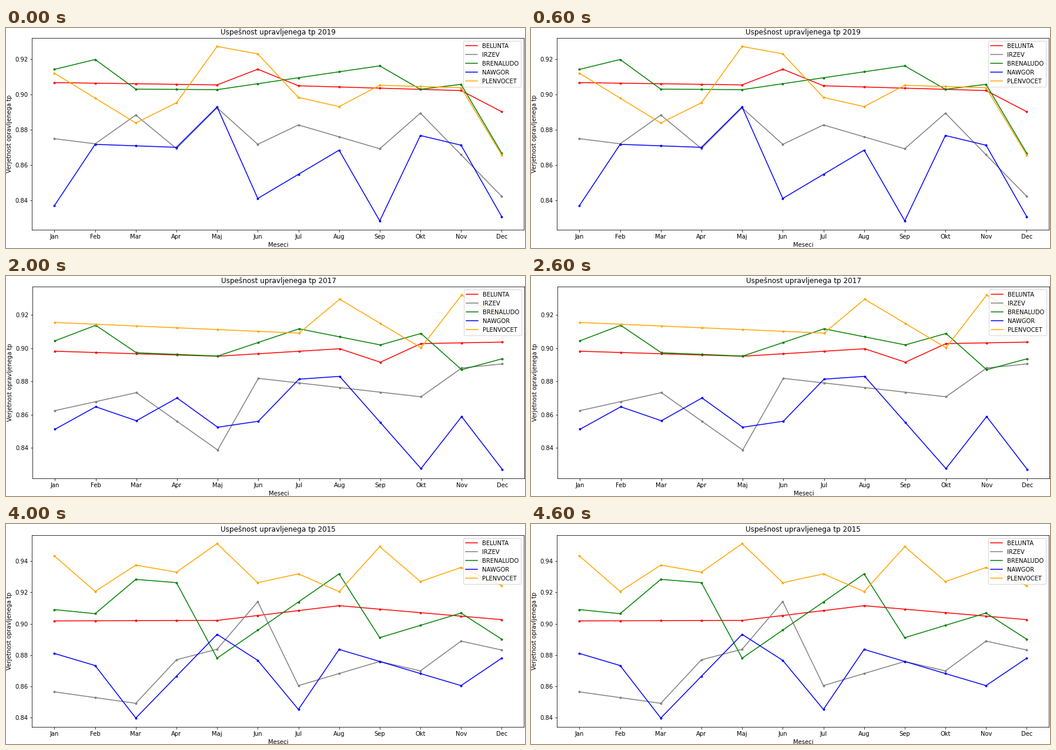
Write a matplotlib script that moves like this. It is 883 by 374 pixels and loops after 5 s.

```python
import numpy as np
import matplotlib.pyplot as plt
from matplotlib.animation import FuncAnimation
from matplotlib.patches import Rectangle

W, H, DPI = 883, 374, 72
AX_W, AX_H = 837, 326.16
DX, DY = 0.43, -0.45  # sub-pixel offset of the axes

MONTHS = ["Jan", "Feb", "Mar", "Apr", "Maj", "Jun",
          "Jul", "Aug", "Sep", "Okt", "Nov", "Dec"]
MAKES = ["BELUNTA", "IRZEV", "BRENALUDO", "NAWGOR", "PLENVOCET"]
COLORS = ["red", "gray", "green", "blue", "orange"]

# Turning points of each make, in 0.0001 above or below a rate of 0.9.
# Months left open lie on the straight run between their neighbours.
_ = np.nan
turns_2019 = [
    [67, _, _, _, 54, 143, 49, _, _, _, 22, -98],
    [-251, -280, -117, -307, -76, -283, -173, _, -308, -106, _, -578],
    [142, 198, 30, _, 27, _, _, _, 162, 29, 57, -333],
    [-630, -283, _, -300, -71, -590, _, -316, -717, -233, -288, -693],
    [120, _, -162, -47, 272, 230, -17, -69, 52, _, 38, -343],
]
turns_2018 = [
    [-35, _, _, _, 37, _, _, 78, -42, _, _, 105],
    [-70, -371, -266, _, -641, -62, _, _, -402, _, _, -182],
    [115, -105, -152, _, 169, 103, -189, -39, -227, _, 90, -117],
    [-723, -389, _, -128, -343, -257, _, _, -434, -285, -344, 289],
    [180, 9, 111, _, 90, _, -88, 77, _, _, _, 4],
]
turns_2017 = [
    [-18, _, _, _, -48, _, _, -3, -84, 28, _, 37],
    [-375, _, -267, _, -612, -181, _, _, _, -292, -119, -94],
    [45, 138, -27, _, -47, _, 117, _, 20, 89, -129, -63],
    [-487, -352, -436, -299, -475, -439, -186, -169, _, -724, -411, -729],
    [155, _, _, _, _, _, 91, 295, _, 3, 320, 180],
]
turns_2016 = [
    [126, _, _, _, 127, -96, -120, _, _, _, _, 77],
    [167, -248, 87, _, -338, _, -478, -283, -461, -134, -120, -279],
    [144, _, 144, 348, _, -222, -75, -95, 263, _, _, 55],
    [-364, -195, -337, _, -160, -462, -507, -185, _, -348, -148, -445],
    [456, _, 333, 478, _, 121, 165, _, 355, _, 247, 366],
]
turns_2015 = [
    [18, _, _, _, 21, _, _, 115, _, _, _, 26],
    [-435, _, -508, -230, -163, 141, -395, _, -241, -301, -111, -168],
    [90, 64, 283, 262, -220, _, _, 318, -89, _, 68, -99],
    [-190, -267, -602, _, -68, -234, -547, -164, _, _, -395, -220],
    [432, 206, 374, 329, 511, 262, 318, 205, 492, 269, 359, 243],
]

# year, turning points, left and top edge of the axes in pixels
PAGES = [
    (2019, turns_2019, 44, 17),
    (2018, turns_2018, 44, 18),
    (2017, turns_2017, 45, 18),
    (2016, turns_2016, 39, 17),
    (2015, turns_2015, 44, 19),
]


def rates(turns):
    """Fill the open months and turn the offsets into rates."""
    turns = np.array(turns, float)
    month = np.arange(len(MONTHS))
    known = ~np.isnan(turns)
    return 0.9 + np.interp(month, month[known], turns[known]) / 1e4


plt.rcParams.update({"font.family": "DejaVu Sans", "font.size": 10})
fig = plt.figure(figsize=(W / DPI, H / DPI), dpi=DPI, facecolor="white")
ax = fig.add_axes([0, 0, 1, 1])
# Hides all but the descenders of the y label when the axes sit further left.
mask = fig.add_artist(Rectangle((0, 0), 3 / W, 1, color="white", lw=0, zorder=10))


def draw(i):
    year, turns, left, top = PAGES[i]
    ax.clear()
    ax.set_position([(left + DX) / W, 1 - (top + DY + AX_H) / H, AX_W / W, AX_H / H])
    lines = [rates(row) for row in turns]
    for name, color, line in zip(MAKES, COLORS, lines):
        ax.plot(MONTHS, line, color=color, lw=1.5, label=name)
        ax.plot(MONTHS, line, ".", color=color, ms=6)
    low, high = np.min(lines), np.max(lines)
    pad = 0.05 * (high - low)
    ax.set_yticks(np.arange(0.82, 0.97, 0.02))
    ax.set_ylim(low - pad, high + pad)
    ax.yaxis.set_major_formatter("{x:.2f}")
    ax.set_title(f"Uspešnost upravljenega tp {year}")
    ax.set_xlabel("Meseci")
    ax.set_ylabel("Verjetnost opravljenega tp")
    ax.legend(loc="upper right")
    mask.set_visible(left < 40)


anim = FuncAnimation(fig, draw, frames=len(PAGES), init_func=lambda: None,
                     interval=1000, repeat=True, repeat_delay=0)
plt.show()
```
